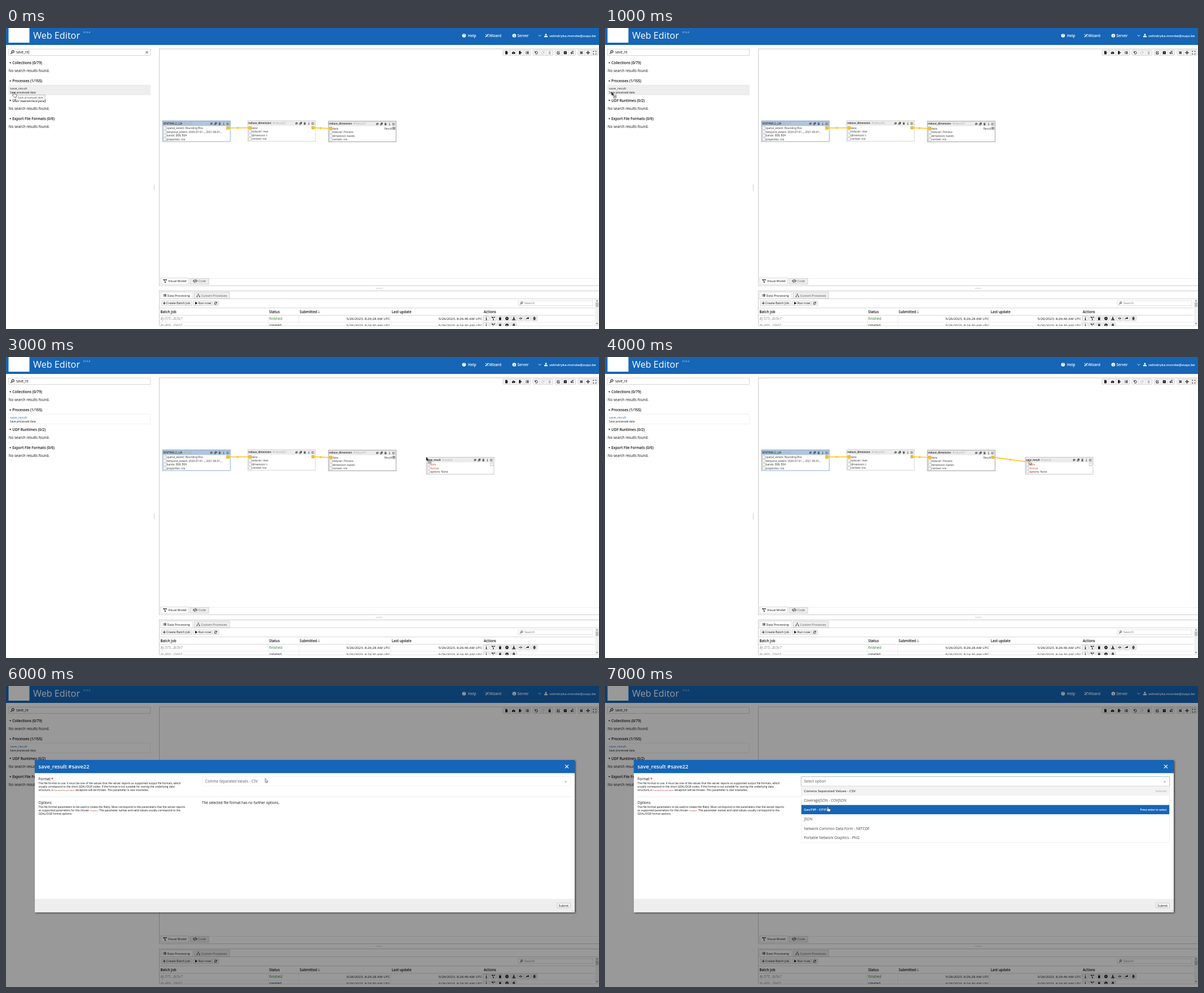
Animation of 1050x533 px, one loop 8 s. Source, as an HTML page:

```html
<!DOCTYPE html>
<html lang="en">
<head>
<meta charset="utf-8">
<title>Web Editor</title>
<style>
html, body { margin: 0; width: 100%; height: 100%; overflow: hidden; background: #fff; }
svg { display: block; width: 100vw; height: 100vh; }
text { font-family: "Open Sans", "Noto Sans", sans-serif; white-space: pre; }
.mono { font-family: "Noto Sans Mono", "DejaVu Sans Mono", monospace; font-size: 3.95px; fill: #b5443c; }
</style>
</head>
<body>
<svg id="stage" viewBox="0 0 1050 533" preserveAspectRatio="none"></svg>
<script>
const BLUE = '#1665b6', YELLOW = '#fdc21b', STEP = 1000, STEPS = 8;

// Icons live in a 10 x 10 box; a leading "~" means stroked.
const ICONS = {
  file: 'M1.5 0H6L8.5 2.5V10H1.5Z',
  cloud: 'M2.5 9A2.6 2.6 0 0 1 2 4 3.2 3.2 0 0 1 7.7 3 3 3 0 0 1 8 9ZM5 4L3.2 6H4.4V7.5H5.6V6H6.8Z',
  out: 'M1 0H6V4H8V2.5L10 5 8 7.5V6H6V10H1Z',
  list: '~M0 2H1.5M3 2H10M0 5H1.5M3 5H10M0 8H1.5M3 8H10',
  undo: '~M1 1V4.5H4.5M1.5 4A4 4 0 1 1 2 7.5',
  redo: '~M9 1V4.5H5.5M8.5 4A4 4 0 1 0 8 7.5',
  trash: 'M.8 1H3.5L4 0H6L6.5 1H9.2V2H.8ZM1.5 3H8.5L8 10H2Z',
  edit: '~M5.5 2H1V9H8V5.5M4 6L9 1',
  box: 'M.5 .5H9.5V9.5H.5ZM4 3V7L7 5Z',
  root: '~M0 5H1.5L3 9 5 1H10M6 4.5L9 8.5M9 4.5L6 8.5',
  shrink: '~M1 1L4 4M4 1.5V4H1.5M9 1L6 4M6 1.5V4H8.5M1 9L4 6M4 8.5V6H1.5M9 9L6 6M6 8.5V6H8.5',
  move: '~M5 0V10M0 5H10M3.5 1.5L5 0 6.5 1.5M3.5 8.5L5 10 6.5 8.5M1.5 3.5L0 5 1.5 6.5M8.5 3.5L10 5 8.5 6.5',
  expand: '~M.5 3V.5H3M7 .5H9.5V3M9.5 7V9.5H7M3 9.5H.5V7',
  info: 'M4 0H6V2H4ZM3 3.5H6V8.5H7V10H3V8.5H4V5H3Z',
  tree: 'M0 0H3V1H7V0H10V3H7V2H4L6 7H7V10H4V7H5L3 3H0Z',
  play: 'M1 0L9.5 5 1 10Z',
  run: 'M5 0A5 5 0 1 1 5 10 5 5 0 1 1 5 0ZM3.8 2.8V7.2L7.5 5Z',
  down: 'M3.8 0H6.2V4H9L5 7.5 1 4H3.8ZM0 7.5H10V10H0Z',
  eye: 'M0 5Q5 -1 10 5 5 11 0 5ZM5 3A2 2 0 1 0 5 7 2 2 0 1 0 5 3Z',
  share: 'M6 0L10 4 6 8V5.5Q2 5.5 0 9 0 3 6 2.5Z',
  bug: 'M5 0A3.2 5 0 1 1 5 10 3.2 5 0 1 1 5 0ZM0 3H10V4H0ZM0 6.5H10V7.5H0Z',
  search: '~M4 6L.5 9.5M6.3 .8A2.9 2.9 0 1 1 6.3 6.6 2.9 2.9 0 1 1 6.3 .8Z',
  sync: '~M1 4.5A4 4 0 0 1 8.5 3M9 .5V3.5H6M9 5.5A4 4 0 0 1 1.5 7M1 9.5V6.5H4',
  plus: '~M5 0V10M0 5H10',
  cross: '~M1 1L9 9M9 1L1 9',
  code: '~M3 2L0 5 3 8M7 2L10 5 7 8M6 1L4 9',
  org: 'M3.5 0H6.5V3H5.5V5H9V7H10V10H7V7H8V6H2V7H3V10H0V7H1V5H4.5V3H3.5Z',
  bubble: 'M5 1A4.5 3.8 0 1 1 3.5 8.4L.5 9.5 1.2 7A4.5 3.8 0 0 1 5 1ZM3 4H7V5.5H3Z',
  copy: 'M3 0H10V7H3ZM0 3H2V8H7V10H0Z',
  disc: 'M5 0A5 5 0 1 1 5 10 5 5 0 1 1 5 0Z',
  wand: 'M0 8.3L8.3 0 10 1.7 1.7 10ZM2 0L2.6 1.4 4 2 2.6 2.6 2 4 1.4 2.6 0 2 1.4 1.4ZM8 5.5L8.6 6.9 10 7.5 8.6 8.1 8 9.5 7.4 8.1 6 7.5 7.4 6.9Z',
  chevron: '~M1 3L5 7 9 3',
  user: 'M5 0A2.5 2.5 0 1 1 5 5 2.5 2.5 0 1 1 5 0ZM0 10V8Q0 6 2.5 6H7.5Q10 6 10 8V10Z'
};

const text = (x, y, s, size = 6.35, fill = '#111', more = '') =>
  `<text x="${x}" y="${y}" font-size="${size}" fill="${fill}" ${more}>${s}</text>`;
const bold = (x, y, s, size = 6.35, fill = '#111', more = '') =>
  text(x, y, s, size, fill, 'font-weight="600" ' + more);
const END = 'text-anchor="end"';
const rect = (x, y, w, h, fill, stroke = 'none', more = '') =>
  `<rect x="${x}" y="${y}" width="${w}" height="${h}" fill="${fill}" stroke="${stroke}" stroke-width=".6" ${more}/>`;
const path = (d, fill, stroke = 'none', width = .6) =>
  `<path d="${d}" fill="${fill}" stroke="${stroke}" stroke-width="${width}"/>`;
const on = (steps, ...parts) => `<g data-on="${steps}">${parts.join('')}</g>`;
const at = (x, y, s) => `<g transform="translate(${x} ${y})">${s}</g>`;

function icon(name, cx, cy, size = 5, color = '#111') {
  const d = ICONS[name], line = d[0] === '~';
  const paint = line ? `fill="none" stroke="${color}" stroke-width="1.7"` : `fill="${color}" fill-rule="evenodd"`;
  return `<path transform="translate(${cx - size / 2} ${cy - size / 2}) scale(${size / 10})" d="${line ? d.slice(1) : d}" ${paint}/>`;
}

function header() {
  const link = (x, s) => bold(x, 16, s, 6.5, '#fff');
  return rect(0, 0, 1050, 30, BLUE) + rect(4.5, 0, 37, 26, '#fff') +
    text(48, 19.3, 'Web Editor', 16.2, '#fff') + text(137, 8.6, '0.12.4', 4.2, '#fff') +
    icon('disc', 811, 13.5, 6.6, '#fff') + bold(811, 15.4, '?', 5.4, BLUE, 'text-anchor="middle"') + link(818, 'Help') +
    icon('wand', 851.7, 13.5, 6.2, '#fff') + link(855.5, 'Wizard') +
    icon('disc', 900, 13.5, 6.6, '#fff') + icon('info', 900, 13.5, 4, BLUE) + link(905.5, 'Server') +
    icon('chevron', 945, 13.5, 5.5, '#fff') + icon('user', 956, 13.2, 6, '#fff') +
    bold(1044.5, 16, 'velindryka.morske@zuqo.be', 6.05, '#fff', END);
}

const item = (fill, title) => rect(4.8, 101, 250.7, 17.6, fill, '#e4e4e4') +
  text(7, 108.7, 'save_result', 5.9, title) + text(7, 115.6, 'Save processed data', 4.8);

function sidebar() {
  const head = (y, s) => path(`M6 ${y - 3.3}h3.2l-1.6 2.4z`, '#111') + bold(11.3, y, s);
  const none = y => text(4.8, y, 'No search results found.');
  return rect(4.5, 37.2, 251, 11.4, '#fff', '#bbb') + icon('search', 11.3, 42.8, 7, '#333') +
    text(18, 45.2, 'save_re', 6.2) +
    on('0', rect(40.3, 39.5, .5, 7, '#111'), icon('cross', 249.5, 43, 5.2, '#123c6b')) +
    head(64, 'Collections (0/79)') + none(78) + head(96.2, 'Processes (1/155)') +
    on('012', item('#eee', '#333')) + on('34567', item('#fff', '#2a6db4')) +
    head(130.6, 'UDF Runtimes (0/2)') + none(144.8) +
    head(163, 'Export File Formats (0/6)') + none(177) +
    on('0', rect(17.5, 118.8, 51.5, 10, '#fff', '#888'), text(21, 125.4, 'Save processed data', 4.7, '#555'));
}

function toolbar() {
  const groups = [
    [880, 49, 'file', 'cloud', 'out', 'list'], [933, 35.5, 'undo', 'redo', 'trash'],
    [972.3, 36, 'edit', 'box', 'root'], [1012.8, 35.5, 'shrink', 'move', 'expand']];
  let s = '';
  for (const [x, w, ...names] of groups) {
    const step = w / names.length;
    s += rect(x, 39, w, 9.4, '#f6f6f6', '#bbb', 'rx="1"');
    names.forEach((name, i) => {
      const cx = x + step * (i + .5);
      if (i) s += rect(x + step * i, 39, .5, 9.4, '#ccc');
      if (name === 'trash') s += on('012345', icon(name, cx, 43.7, 5.7, '#bbb')) + on('67', icon(name, cx, 43.7, 5.7));
      else s += icon(name, cx, 43.7, 5.7, name === 'redo' ? '#bbb' : '#111');
    });
  }
  return s;
}

const port = (x, y, fill) => rect(x, y, 4.7, 4.7, fill, fill === YELLOW ? '#c99a1c' : '#a0a0a0');

// rows: [label, port colour, text colour]; out: [port colour, label]
function node(x, y, title, id, rows, out, border, head = '#ececec') {
  const h = 10.4 + rows.length * 6.55;
  let s = rect(x, y, 119.8, h, '#fff') + rect(x, y, 119.8, 9, head) +
    rect(x, y, 119.8, h, 'none', border, 'style="stroke-width:.8"') +
    `<text x="${x + 1}" y="${y + 6.4}" font-size="4.6" fill="#222" font-weight="600">${title}<tspan fill="#aaa" font-weight="400" dx="2.6">${id}</tspan></text>`;
  ['bubble', 'copy', 'trash', 'info', 'edit'].forEach((name, i) =>
    s += icon(name, x + 86.5 + i * 7.25, y + 4.9, 4.6, '#555'));
  rows.forEach(([label, fill = '#fff', color = '#333'], i) =>
    s += port(x + 1.7, y + 10.5 + i * 6.55, fill) + text(x + 7.2, y + 14.7 + i * 6.55, label, 4.75, color));
  s += port(x + 113.3, y + 10.2, out[0]);
  if (out[1]) s += text(x + 112.6, y + 14.7, out[1], 4.75, '#333', END);
  return s;
}

function edge(x1, y1, x2, y2) {
  const mx = (x1 + x2) / 2, my = (y1 + y2) / 2, turn = Math.atan2(y2 - y1, x2 - x1) * 180 / Math.PI;
  return path(`M${x1} ${y1}L${x2} ${y2}`, 'none', YELLOW, 1.6) +
    `<path transform="translate(${mx} ${my}) rotate(${turn})" d="M-2 -2.2L2.4 0 -2 2.2Z" fill="${YELLOW}"/>`;
}

function graph() {
  const reduce31 = [['data', YELLOW], ['reducer: Process'], ['dimension: bands'], ['context: n/a']];
  const third = (out, border) => node(571, 165, 'reduce_dimension', '#reduce31', reduce31, out, border);
  const save = (data, out, border) => node(744.2, 177.5, 'save_result', '#save22',
    [data, ['format', '#fff', '#d0432b'], ['options: None']], out, border);
  return node(277.3, 164.5, 'SENTINEL2_L2A', '#load5', [['spatial_extent: Bounding Box'],
      ['temporal_extent: 2020-07-01..., 2021-06-01...'], ['bands: B08, B04'], ['properties: n/a']],
      [YELLOW], '#6f97c4', '#b0c5dc') +
    node(428, 164, 'reduce_dimension', '#reduce20',
      [['data', YELLOW], ['reducer: max'], ['dimension: t'], ['context: n/a']], [YELLOW], '#ccc') +
    on('0123', third(['#999', 'Result'], '#888')) + on('4', third([YELLOW, 'Result'], '#888')) +
    on('567', third([YELLOW], '#ccc')) +
    on('34', save(['data', '#fff', '#d0432b'], ['#fff'], '#bbb')) +
    on('567', save(['data', YELLOW], ['#999', 'Result'], '#888')) +
    edge(393, 177, 429, 176.8) + edge(544, 176.8, 571.5, 177.7) +
    on('4', edge(688, 177.6, 750, 186)) + on('567', edge(688, 177.6, 747, 189.3));
}

function editor() {
  return rect(271.6, 37, 790, 419.2, '#fff', '#aaa') + toolbar() + graph() +
    rect(271.6, 443, 779, .5, '#ddd') +
    rect(274, 442.8, 49.3, 11, '#fff', '#bbb') + icon('tree', 281.5, 448, 6) + text(287, 450.3, 'Visual Model', 5.5) +
    rect(326, 443.2, 33, 10.6, '#eee', '#bbb') + icon('code', 335, 448, 7, '#555') + text(340.5, 450.3, 'Code', 5.6, '#555') +
    rect(655, 460, 11.5, 1.6, '#ddd') + rect(261.8, 277, 1.6, 10.5, '#ddd');
}

function jobs() {
  const button = (x, w, name, s) => rect(x, 483, w, 8.6, '#f6f6f6', '#bbb', 'rx="1"') +
    icon(name, x + 5.3, 487.3, 5) + text(x + 8.8, 489.3, s, 5.5);
  const row = (y, id, status, color, d1, d2, names) =>
    text(273.5, y, id, 6.3, '#888', 'font-style="italic"') + text(466, y, status, 6.2, color) +
    text(680, y, d1, 6.15, '#111', END) + text(843, y, d2, 6.15, '#111', END) +
    names.map((name, i) => rect(845.6 + i * 12.15, y - 6.8, 10, 8.4, '#f6f6f6', '#b4b4b4', 'rx="1"') +
      icon(name, 850.6 + i * 12.15, y - 2.5, 5.7)).join('');
  const acts = ['info', 'tree', 'trash', 'run', 'down', 'eye', 'share', 'bug'];
  const day = '5/26/2023, ';
  const head = (x, s) => bold(x, 505, s, 6.15);
  return `<g clip-path="url(#jobs)">` + rect(271.6, 465.3, 790, 62, '#fff', '#aaa') + rect(271.6, 479, 779, .6, '#bbb') +
    rect(274, 467.7, 57, 11.6, '#fff', '#bbb') + icon('list', 281, 473.4, 5.5) + text(285.5, 475.5, 'Data Processing', 5.4) +
    rect(333.3, 467.7, 62.7, 11.4, '#eee', '#bbb') + icon('org', 340.5, 473.4, 6, '#555') + text(345.5, 475.5, 'Custom Processes', 5.4, '#555') +
    button(275, 54, 'plus', 'Create Batch Job') + button(331.7, 32.5, 'play', 'Run now') + button(366, 10.7, 'sync', '') +
    rect(907, 483, 132, 8.6, '#fff', '#ccc') + icon('search', 912.5, 487.3, 5.5, '#333') + text(917.8, 489.4, 'Search', 5.8, '#777') +
    [495.5, 508.6, 520.7].map((y, i) => rect(272, y, 770, .6, i < 2 ? '#bbb' : '#ddd')).join('') +
    [464.3, 518.3, 681, 844.2].map(x => rect(x, 509, .5, 20, '#ddd')).join('') +
    head(273.5, 'Batch Job') + head(466, 'Status') + head(520, 'Submitted') + head(683, 'Last update') + head(846, 'Actions') +
    path('M554 500.2v4.6m-1.5 -1.6l1.5 1.6l1.5 -1.6', 'none', '#555') +
    row(516.8, '#j-575...8c5e7', 'finished', '#2b7a2b', day + '8:26:28 AM UTC', day + '8:26:46 AM UTC', acts) +
    row(528.8, '#j-d06...f3e07', 'created', '#111', day + '8:24:30 AM UTC', day + '8:24:30 AM UTC', [...acts.slice(0, 4), 'bug']) +
    rect(1043, 479.5, 7, 48, '#f1f1f1') + rect(1044, 486, 5, 8, '#c1c1c1') +
    path('M1045 484l1.6 -2l1.6 2zM1045 522.5l1.6 2l1.6 -2z', '#555') + '</g>';
}

function modal() {
  const code = s => `<tspan class="mono">${s}</tspan>`;
  const lines = (y, list) => list.map((s, i) => text(57.6, y + i * 5.95, s, 4.78)).join('');
  const choices = ['Comma Separated Values - CSV', 'CoverageJSON - COVJSON', 'GeoTiff - GTIFF', 'JSON',
    'Network Common Data Form - NETCDF', 'Portable Network Graphics - PNG'];
  const menu = choices.map((s, i) => {
    const y = 177.5 + i * 16.6, fill = ['#f3f3f3', '#fff', BLUE][i] || '#fff';
    return rect(347.3, y, 652, 16.6, fill) +
      (i % 2 || i > 2 ? text(352.3, y + 10.6, s, 6.35, '#444') : bold(352.3, y + 10.6, s, 6.1, i ? '#fff' : '#444'));
  }).join('');
  return rect(0, 0, 1050, 533, '#000', 'none', 'opacity=".4"') +
    rect(51, 131, 956, 269.5, '#fff', 'none', 'filter="url(#shade)"') +
    rect(51, 131, 956, 23.3, BLUE) + bold(57.4, 146, 'save_result #save22', 9.4, '#fff') + icon('cross', 993, 142.6, 7.5, '#fff') +
    text(57.6, 167, 'Format <tspan fill="#e02020" font-weight="700">*</tspan>', 6.25) +
    lines(174.3, ['The file format to use. It must be one of the values that the server reports as supported output file formats, which',
      'usually correspond to the short GDAL/OGR codes. If the format is not suitable for storing the underlying data',
      `structure, a ${code('FormatUnsuitable')} exception will be thrown. This parameter is <tspan font-style="italic">case insensitive</tspan>.`]) +
    rect(57.5, 195.6, 943, .6, '#ddd') + text(57.6, 209, 'Options', 6.25) +
    lines(216, ['The file format parameters to be used to create the file(s). Must correspond to the parameters that the server reports',
      `as supported parameters for the chosen ${code('format')}. The parameter names and valid values usually correspond to the`,
      'GDAL/OGR format options.']) +
    on('6', rect(347.3, 160.5, 652.5, 16.5, '#fff', '#e8e8e8', 'rx="2"'), text(352.6, 171.2, choices[0], 6.4, '#555'),
      path('M989 168.7h4l-2 2.2z', '#999'), text(347, 209, 'The selected file format has no further options.', 6.25)) +
    on('7', rect(347.3, 160.5, 652.5, 16.8, '#fff', '#6f93bd', 'rx="1"'), text(352.6, 171.2, 'Select option', 6.4, '#555'),
      path('M989 170.2h4l-2 -2.2z', '#999'), menu, rect(347.3, 177.5, 652.5, 99.6, 'none', '#e4e4e4'),
      text(994.5, 187.8, 'Selected', 5.1, '#aaa', END), bold(994.5, 220.8, 'Press enter to select', 4.8, '#fff', END)) +
    rect(51, 377, 956, 23.5, '#eee') + rect(975.8, 384.3, 23.5, 8.4, '#f6f6f6', '#aaa', 'rx="1"') + text(978.6, 390.5, 'Submit', 5.3) +
    path('M1003 399.5l3 -3M1005 399.5l1 -1', 'none', '#888', .5);
}

function pointers() {
  const arrow = path('M0 0V7L1.6 5.6 2.7 8 3.8 7.5 2.8 5.2H4.8Z', '#fff', '#222', .6);
  const drag = path('M0 0V6.6L1.6 5.3 2.6 7.6 3.6 7.1 2.7 5H4.6Z', '#222') +
    rect(3.6, 6.2, 5, 5, '#fff', '#222', 'rx=".5"') + path('M6.1 7.3v2.8m-1.4 -1.4h2.8', 'none', '#222', .7);
  const hand = path('M0 .6Q.9 -.6 1.6 .6V3.4L5 4.2Q6 4.6 5.8 6L5.2 9H1.2L-1.6 5.8Q-1.8 4.6 -.6 5L0 5.6Z', '#fff', '#222', .6);
  return on('2', `<g mask="url(#fade)">${at(335, 58.8, item('#eee', '#333'))}</g>`) +
    on('0', at(13, 113.5, hand)) + on('1', at(11.5, 113, drag)) +
    on('2', at(348.6, 173, drag)) + on('3', at(744, 177, drag)) + on('4', at(751, 183.5, arrow)) +
    on('5', '<circle cx="750.3" cy="189" r="9.6" fill="#b8433c" fill-opacity=".5" stroke="#a55" stroke-opacity=".5"/>', at(750.5, 188.5, hand)) +
    on('6', at(459, 163.7, arrow)) + on('7', at(393.6, 213.6, hand));
}

const stage = document.getElementById('stage');
stage.innerHTML = `<defs>
  <clipPath id="jobs"><rect x="271" y="465" width="779" height="62.6"/></clipPath>
  <linearGradient id="ramp" gradientUnits="userSpaceOnUse" x1="339" x2="540" y1="0" y2="0">
    <stop stop-color="#fff" stop-opacity=".65"/><stop offset="1" stop-color="#fff" stop-opacity="0"/></linearGradient>
  <mask id="fade" maskUnits="userSpaceOnUse" x="330" y="150" width="270" height="40"><rect x="330" y="150" width="270" height="40" fill="url(#ramp)"/></mask>
  <filter id="shade" x="-2%" y="-5%" width="104%" height="110%"><feDropShadow dx="1.5" dy="1.5" stdDeviation="1.5" flood-opacity=".6"/></filter>
</defs>` + rect(0, 0, 1050, 533, '#fff') + header() + sidebar() + editor() + jobs() + on('67', modal()) + pointers();

const parts = [...stage.querySelectorAll('[data-on]')];
const start = performance.now();
function draw(now) {
  const step = Math.floor(Math.max(0, now - start) / STEP) % STEPS;
  for (const part of parts) part.style.display = part.dataset.on.includes(step) ? '' : 'none';
  requestAnimationFrame(draw);
}
draw(start);
</script>
</body>
</html>
```
